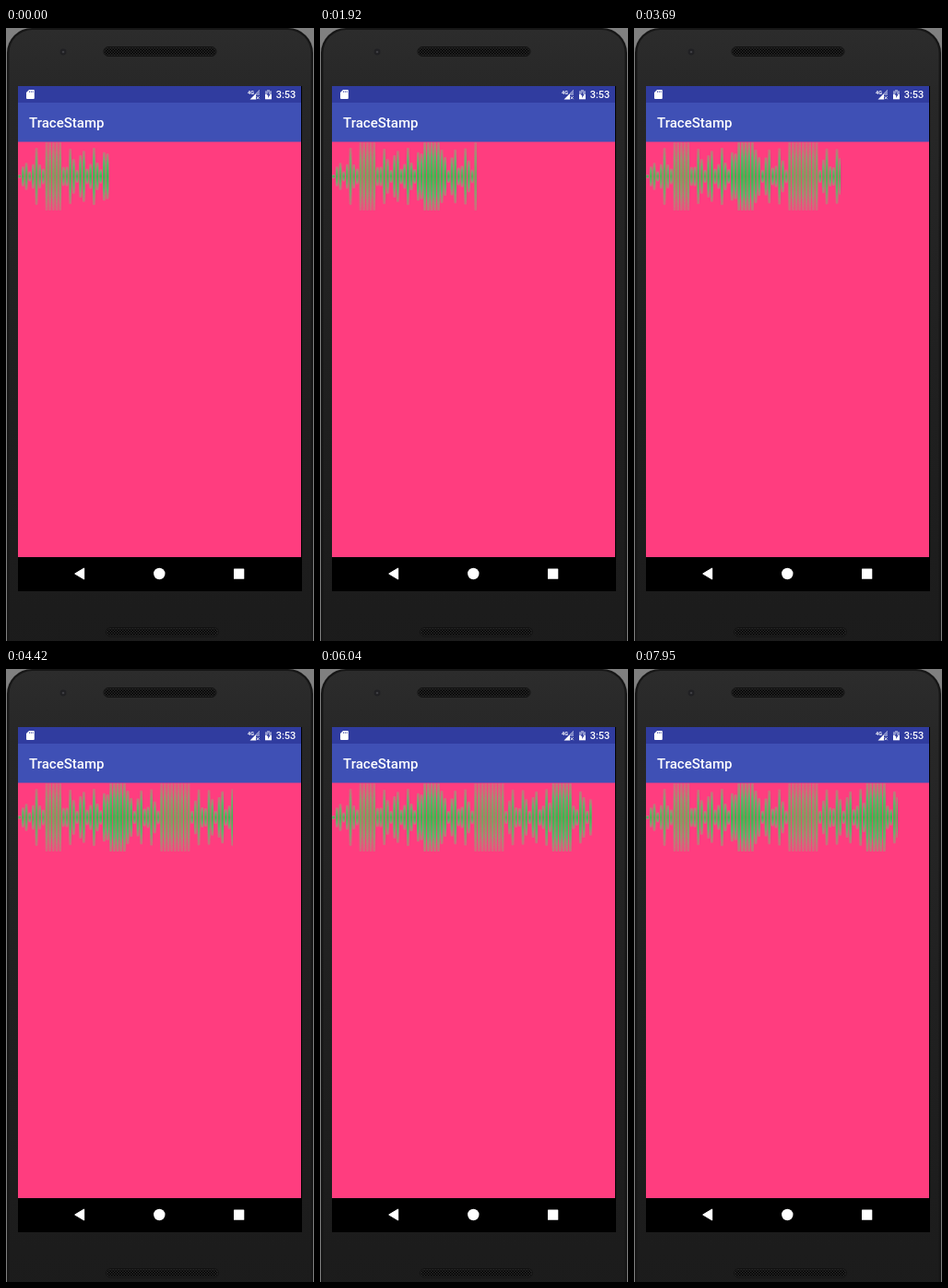
An HTML page for the animation above (8000 ms loop, 334x665 px).

```html
<!DOCTYPE html>
<html lang="en">
<head>
<meta charset="utf-8">
<title>Waveform reveal</title>
<style>
  html, body { margin: 0; width: 100%; height: 100%; overflow: hidden; background: #808080; }
  svg { display: block; width: 100vw; height: 100vh; }
  text { font-family: Roboto, "Open Sans", sans-serif; font-weight: 500; fill: #fff; }
</style>
</head>
<body>
<svg viewBox="0 0 334 665" preserveAspectRatio="none">
  <defs>
    <linearGradient id="body" x2="0" y2="1">
      <stop offset="0" stop-color="#2c2c2c"/>
      <stop offset=".1" stop-color="#272727"/>
      <stop offset=".5" stop-color="#202020"/>
      <stop offset="1" stop-color="#1b1b1b"/>
    </linearGradient>
    <linearGradient id="fresh" x2="0" y2="1">
      <stop offset="0" stop-color="#8f9f78" stop-opacity=".35"/>
      <stop offset=".22" stop-color="#4fbd68" stop-opacity=".9"/>
      <stop offset=".5" stop-color="#38b850"/>
      <stop offset=".78" stop-color="#4fbd68" stop-opacity=".9"/>
      <stop offset="1" stop-color="#8f9f78" stop-opacity=".35"/>
    </linearGradient>
    <linearGradient id="worn" x2="0" y2="1">
      <stop offset="0" stop-color="#c4817c" stop-opacity=".5"/>
      <stop offset=".25" stop-color="#b09472" stop-opacity=".9"/>
      <stop offset=".5" stop-color="#98a066"/>
      <stop offset=".75" stop-color="#b09472" stop-opacity=".9"/>
      <stop offset="1" stop-color="#c4817c" stop-opacity=".5"/>
    </linearGradient>
    <radialGradient id="glow">
      <stop offset="0" stop-color="#94784e" stop-opacity=".9"/>
      <stop offset=".5" stop-color="#94784e" stop-opacity=".5"/>
      <stop offset="1" stop-color="#b8686a" stop-opacity="0"/>
    </radialGradient>
    <pattern id="mesh" width="3" height="3" patternUnits="userSpaceOnUse">
      <path d="M0 0h1.5v1.5h-1.5zM1.5 1.5h1.5v1.5h-1.5z"/>
    </pattern>
    <filter id="soft" x="-5%" y="-5%" width="110%" height="110%">
      <feGaussianBlur stdDeviation=".4 .6"/>
    </filter>
    <clipPath id="reveal"><rect id="window" x="13" y="123" height="75"/></clipPath>
  </defs>

  <rect width="334" height="665" fill="#808080"/>
  <rect x="1" y="0" width="332" height="700" rx="27" fill="#161616"/>
  <rect x="3.5" y="2" width="327" height="700" rx="25" fill="url(#body)"/>
  <circle cx="62" cy="26" r="3.4" fill="#202023"/>
  <circle cx="62" cy="26" r="1.3" fill="#3d3d42"/>
  <g stroke="#111" fill="#282828">
    <rect x="106" y="20.5" width="122" height="10" rx="5"/>
    <rect x="108.5" y="650.5" width="122" height="9.5" rx="4.7"/>
  </g>
  <g fill="url(#mesh)">
    <rect x="107" y="21.5" width="120" height="8" rx="4"/>
    <rect x="109.5" y="651.5" width="120" height="7.5" rx="3.7"/>
  </g>

  <rect x="13" y="63" width="308" height="548" fill="#000"/>
  <rect x="13" y="63" width="307" height="18.5" fill="#303c9f"/>
  <rect x="13" y="81" width="307" height="43" fill="#3f50b5"/>
  <rect x="13" y="123.5" width="307" height="450.5" fill="#ff3d7f"/>

  <path d="M25 67h5q.8 0 .8 1v8q0 1-1 1h-6.800q-1 0-1-1v-6z" fill="#fff"/>
  <path d="M25.500 68.300v1.700M27.300 68.300v1.700M29.100 68.300v1.700" stroke="#303c9f" stroke-width=".7"/>
  <text x="262" y="71.500" font-size="5.600" style="font-weight:700">4G</text>
  <path d="M275 67v6h-4v4.500h-6.500z" fill="#fff"/>
  <path d="M275 67v6h-4v-1.800z" fill="#8089c7"/>
  <path d="M271.700 74.200l3 3m0-3l-3 3" stroke="#fff" stroke-width=".9"/>
  <path d="M281 68.200h2v-1.200h3v1.200h2v3.800h-7z" fill="#8f97cd"/>
  <path d="M281 72h7v5.300h-7z" fill="#fff"/>
  <path d="M285 69l-2.300 3.800h1.500v3.200l2.300-4h-1.500z" fill="#303c9f"/>
  <text x="292.700" y="76.300" font-size="11">3:53</text>
  <text x="25" y="108" font-size="15">TraceStamp</text>

  <g clip-path="url(#reveal)"><g id="wave" filter="url(#soft)"></g></g>

  <g fill="#fff">
    <path d="M74.700 592l10-6v12z" stroke="#fff" stroke-linejoin="round"/>
    <circle cx="166.300" cy="592" r="6.200"/>
    <rect x="247" y="586.500" width="11.300" height="11.300" rx=".6"/>
  </g>
</svg>
<script>
const LOOP = 8000, STEP = 147;
const EDGE = 112, SPEED = 4.46, TURN = 319.5, SCREEN = 13;
const MID = 161, LEFT = 14.7, PITCH = 3.667, COUNT = 84, FULL = 37;

// First and last bar of each full-height run
const loud = [[8, 12], [27, 31], [42, 50], [65, 70]];

const barX = i => LEFT + i * PITCH;
const swing = (value, peak, period) => 0.5 + 0.5 * Math.cos((value - peak) / period * 2 * Math.PI);
const isLoud = i => loud.some(([first, last]) => i >= first && i <= last);

// The quiet stretches pulse about every three and a half bars
function halfHeight(i) {
  if (isLoud(i)) return FULL;
  const rise = Math.min(1, (i + 2) / 7);
  return rise * (7 + 24 * swing(i, 15.2, 3.42) ** 1.2);
}

// Colour drifts between brown and green along the wave
const wear = x => swing(x, 45, 143);

function bar(i) {
  const half = halfHeight(i), x = barX(i);
  const rect = (fill, alpha) =>
    `<rect x="${x - 1.3}" y="${MID - half}" width="2.6" height="${2 * half}" rx=".8" fill="url(#${fill})" opacity="${alpha}"/>`;
  return rect("worn", 0.85) + rect("fresh", 1 - wear(x) * (isLoud(i) ? 0.65 : 0.35));
}

function glow([first, last]) {
  const x = barX((first + last) / 2), rx = (last - first) * PITCH / 2 + 5;
  return `<ellipse cx="${x}" cy="${MID}" rx="${rx}" ry="28" fill="url(#glow)" opacity="${0.9 - 0.5 * wear(x)}"/>`;
}

function drawWave() {
  const bars = Array.from({ length: COUNT }, (_, i) => bar(i));
  document.getElementById("wave").innerHTML = loud.map(glow).join("") + bars.join("");
}

const view = document.getElementById("window");

// The edge moves right in even steps and turns back at the screen's side
function render(time) {
  const travel = EDGE + SPEED * Math.floor(time % LOOP / STEP);
  const edge = TURN - Math.abs(TURN - travel);
  view.setAttribute("width", Math.round(edge) - SCREEN);
}

let start;
function tick(now) {
  start ??= now;
  render(now - start);
  requestAnimationFrame(tick);
}

drawWave();
render(0);
requestAnimationFrame(tick);
</script>
</body>
</html>
```
